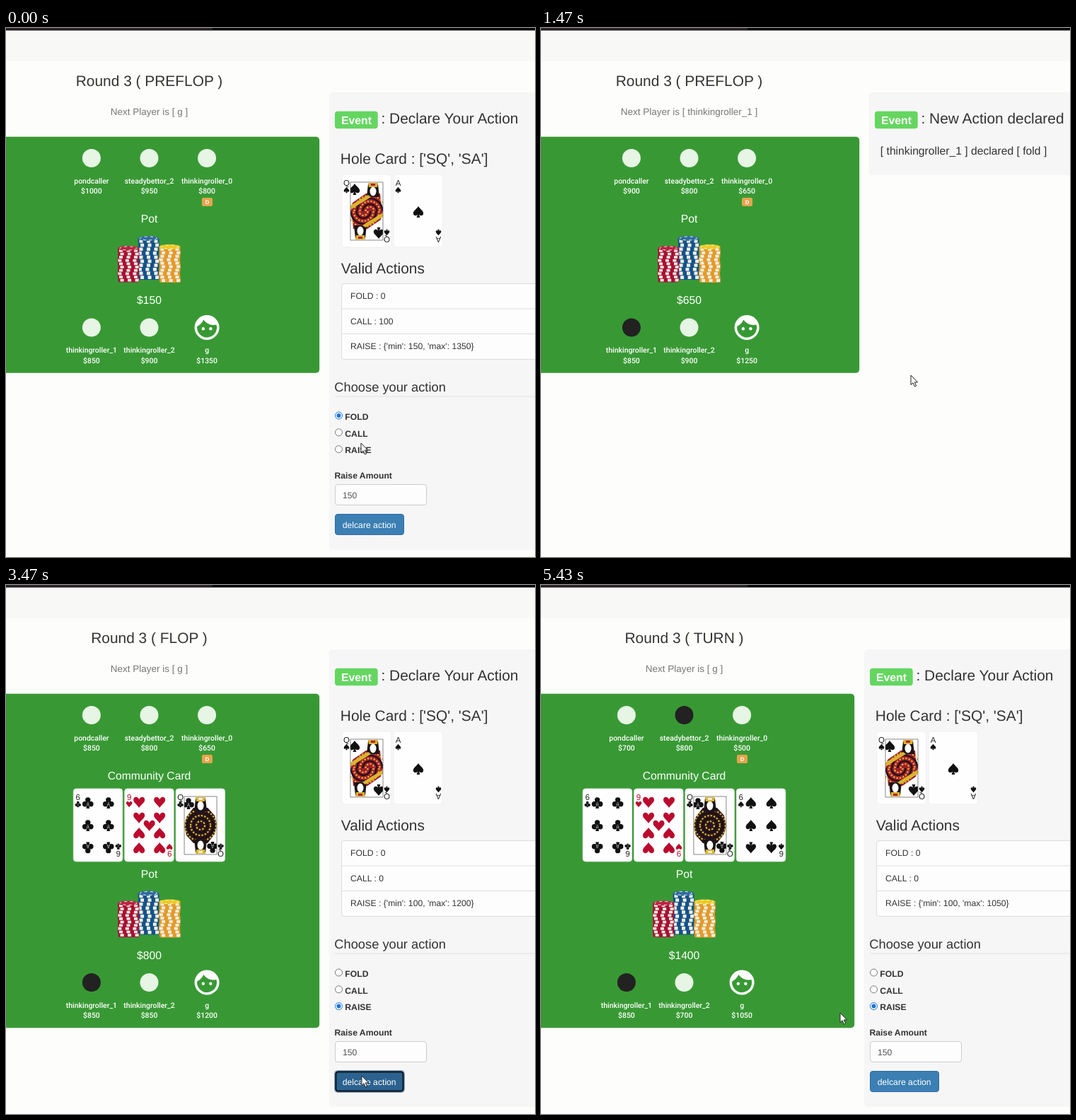
An HTML page with a canvas that plays this animation: 748x748 px, repeating every 5460 ms.

```html
<!DOCTYPE html>
<html lang="en">
<head>
<meta charset="utf-8">
<title>Card table</title>
<style>
html, body { margin: 0; width: 100%; height: 100%; overflow: hidden; background: #fdfdfc }
canvas { display: block }
</style>
</head>
<body>
<canvas id="stage" width="748" height="748"></canvas>
<script>
const c = document.getElementById('stage').getContext('2d');
const LOOP = 5460, GREEN = '#389934', ARIAL = '"Liberation Sans", Arial, sans-serif';
const NAMES = ['pondcaller', 'steadybettor_2', 'thinkingroller_0', 'thinkingroller_1', 'thinkingroller_2', 'g'];
const STACKS = [1000, 950, 800, 850, 900, 1350];
const COMMUNITY = ['6C', '9H', 'QC', '6S'];

// time, kind, then: player / paid / action, or street, or call / min / max
const EVENTS = [
  [0, 'ask', 100, 150, 1350],
  [530, 'act', 5, 100, 'call $100'],
  [740, 'act', 0, 100, 'call $100'],
  [950, 'act', 1, 150, 'raise $150'],
  [1160, 'act', 2, 150, 'call $150'],
  [1370, 'act', 3, 0, 'fold'],
  [1580, 'act', 4, 50, 'call $150'],
  [1700, 'ask', 150, 200, 1350],
  [2270, 'act', 5, 50, 'call $150'],
  [2470, 'act', 0, 50, 'call $150'],
  [2670, 'street', 'FLOP'],
  [2870, 'ask', 0, 100, 1200],
  [3580, 'act', 5, 150, 'raise $150'],
  [3800, 'act', 0, 150, 'call $150'],
  [4050, 'act', 1, 0, 'fold'],
  [4280, 'act', 2, 150, 'call $150'],
  [4510, 'act', 4, 150, 'call $150'],
  [4740, 'street', 'TURN'],
  [4950, 'ask', 0, 100, 1050]
];
const POINTER = [
  [0, 502, 587], [60, 502, 587], [180, 487, 570], [240, 487, 570], [410, 503, 692],
  [500, 503, 692], [590, 515, 550], [740, 523, 491], [1700, 523, 491], [1960, 508, 692],
  [2210, 508, 692], [2480, 455, 500], [2700, 420, 368], [2890, 420, 368], [3060, 473, 594],
  [3130, 473, 594], [3340, 503, 694], [3550, 503, 694], [3800, 467, 251], [4650, 467, 251],
  [5280, 423, 605], [LOOP, 423, 605]
];
const BUTTON = [[390, 530, '#2b628f'], [1960, 2270, '#254f70'], [3330, 3580, '#2b628f']];

const HEART = new Path2D('M0 1C-.3 .5-1 .1-1-.4C-1-1.05-.2-1.1 0-.45C.2-1.1 1-1.05 1-.4C1 .1 .3 .5 0 1Z');
const SPADE = new Path2D('M0-1C-.3-.5-.9-.2-.9 .25C-.9 .75-.3 .8-.1 .4L-.3 1H.3L.1 .4C.3 .8 .9 .75 .9 .25C.9-.2 .3-.5 0-1Z');
const CLUB = new Path2D('M-.1 0L-.3 1H.3L.1 0Z');
for (const [x, y] of [[0, -.52], [-.52, .22], [.52, .22]]) {
  CLUB.moveTo(x, y);
  CLUB.arc(x, y, .46, 0, 7);
}
const SUITS = { H: HEART, S: SPADE, C: CLUB };
const FACE = new Path2D('M-10 0A10 10 0 1 1 10 0A10 10 0 1 1-10 0ZM-7.95-.86A8 8 0 1 0 7.67-2.26C6.95-2.09 6.2-2 5.42-2C2.05-2-.93-3.67-2.74-6.23C-3.72-3.84-5.59-1.91-7.95-.86Z');
const ARROW = new Path2D('M0 0V13.5L3.1 10.7L5.4 16L7.6 15L5.3 9.9H9.5Z');
const HAND = new Path2D('M2 1Q3.5-.5 5 1V6L11 7.5Q12.5 8 12 10L10.5 16H4L-.5 10.5Q0 8.5 2 10Z');

function rect(x, y, w, h, fill, r = 0, line, width = 1) {
  c.beginPath();
  c.roundRect(x, y, w, h, r);
  if (fill) { c.fillStyle = fill; c.fill(); }
  if (line) { c.strokeStyle = line; c.lineWidth = width; c.stroke(); }
}
function oval(x, y, rx, ry, fill, line) {
  c.beginPath();
  c.ellipse(x, y, rx, ry, 0, 0, 7);
  if (fill) { c.fillStyle = fill; c.fill(); }
  if (line) { c.strokeStyle = line; c.lineWidth = 1; c.stroke(); }
}
function poly(fill, ...p) {
  c.beginPath();
  for (let i = 0; i < p.length; i += 2) c.lineTo(p[i], p[i + 1]);
  c.fillStyle = fill;
  c.fill();
}
function text(s, x, y, size, color = '#333', align = 'left', weight = 400, family = ARIAL) {
  c.font = `${weight} ${size}px ${family}`;
  c.textRendering = 'geometricPrecision';
  c.textAlign = align;
  c.fillStyle = color;
  c.fillText(s, x, y);
}
function at(x, y, turn, draw) {
  c.save();
  c.translate(x, y);
  c.rotate(turn * Math.PI);
  draw();
  c.restore();
}
function pip(suit, x, y, r, turn = 0) {
  at(x, y, turn, () => {
    c.scale(r, r);
    c.fillStyle = suit == 'H' ? '#ba0a2e' : '#111';
    c.fill(SUITS[suit]);
  });
}

function queenHalf(suit) {
  const spade = suit == 'S', fx = spade ? 9 : 0;
  c.beginPath();
  c.rect(-23, -41, 46, 41);
  c.clip();
  rect(-23, -41, 46, 41, '#fff');
  poly(spade ? '#a01c2e' : '#2a151c', -23, 0, -20, -12, fx - 10, -25, fx + 10, -25, 20, -14, 23, 0);
  // ornamented rings around the waist
  [6, 10, 14, 18, 22].forEach((r, i) => {
    c.beginPath();
    c.arc(fx / 2, 0, r, Math.PI, 0);
    c.lineWidth = 2.2;
    c.strokeStyle = i % 2 ? '#1c1216' : '#d9b530';
    c.setLineDash(i % 2 ? [] : [2.5, 2]);
    c.stroke();
  });
  c.setLineDash([]);
  poly('#1c1414', fx - 9, -20, fx - 7, -38, fx + 7, -38, fx + 9, -20);
  oval(fx, -28, 4.5, 6.5, '#fff');
  poly('#d9b530', fx - 6, -34, fx - 7, -40, fx + 7, -40, fx + 6, -34);
  poly(spade ? '#b81c30' : '#f4efe2', fx - 3, -36, fx - 3, -39, fx + 3, -39, fx + 3, -36);
  if (spade) poly('#d9b530', -23, -2, -23, -8, 2, -23, 6, -20);
  pip(suit, -17, -31, 8);
}

function card(id, x, y) {
  const [rank, suit] = id, color = suit == 'H' ? '#ba0a2e' : '#222';
  rect(x, y, 69.5, 103, '#fefefe', 4, '#e8ece8', .7);
  if (rank == 'A') pip(suit, x + 35, y + 53, 8);
  if (rank == '6') for (const px of [20.5, 49.5])
    [20, 52, 83.5].forEach((py, i) => pip(suit, x + px, y + py, 8, i == 2 ? 1 : 0));
  if (rank == '9') {
    for (const px of [20.5, 49.5])
      [19, 41, 63, 84].forEach((py, i) => pip(suit, x + px, y + py, 8, i > 1 ? 1 : 0));
    pip(suit, x + 35, y + 52, 8);
  }
  for (const turn of [0, 1]) at(x + 35, y + 52, turn, () => {
    if (rank == 'Q') {
      c.save();
      queenHalf(suit);
      c.restore();
    }
    text(rank, -28.5, -36, 11.5, color, 'center');
    pip(suit, -28.5, -30, 4.3);
  });
  if (rank == 'Q') rect(x + 12, y + 11, 46, 82, null, 0, '#555', .7);
}

function chips(x, top, bottom, color, cap) {
  const n = 10, h = (bottom - top - 4) / n;
  for (let i = 0; i < n; i++) {
    const y = bottom - (i + 1) * h, sway = Math.abs(i % 4 - 2) * 1.6 - 1.6;
    rect(x - 15 + sway / 3, y - 1, 30, h + 2, color, 2);
    for (const px of [-13, -2.5, 8]) rect(x + px + sway, y - .5, 5, h + .5, '#f4efe2');
  }
  oval(x, top + 3.5, 15, 3.5, cap);
  c.setLineDash([4, 4]);
  oval(x, top + 3.5, 12, 2.5, null, '#f4efe2');
  c.setLineDash([]);
}

function player(s, i, x, y) {
  if (i == 5) at(x, y, 0, () => {
    c.scale(1.75, 1.75);
    c.fillStyle = '#fff';
    c.fill(FACE, 'evenodd');
    oval(-3, 1, 1.25, 1.25, '#fff');
    oval(3, 1, 1.25, 1.25, '#fff');
  });
  else oval(x, y, 13, 13, s.folded[i] ? '#222' : '#e6f5e4');
  const line = (s, y) => text(s, x, y, 10.45, '#fff', 'center', 500, 'Roboto, sans-serif');
  line(NAMES[i], y + 35.5);
  line('$' + s.stacks[i], y + 50);
}

function board(s, dx) {
  const mid = 202.5 + dx, drop = s.cards ? 138.5 : 0;
  text(`Round 3 ( ${s.street} )`, mid, 82.3, 20.9, '#333', 'center');
  text(`Next Player is [ ${NAMES[s.who]} ]`, mid, 123.3, 13.5, '#777', 'center');
  rect(-10, 153.7, 453.2 + dx, 334 + drop, GREEN, 5);
  for (let i = 0; i < 6; i++)
    player(s, i, mid + (i % 3 - 1) * 81.6, i < 3 ? 184 : 423.5 + drop);
  rect(mid + 74.5, 240, 15, 12, '#e5a54c', 2);
  text('D', mid + 82, 249, 7.8, '#fff', 'center', 'bold');
  if (s.cards) {
    text('Community Card', mid, 275, 15.7, '#fff', 'center');
    for (let i = 0; i < s.cards; i++) card(COMMUNITY[i], mid + (i - s.cards / 2) * 72.4 + 1.4, 288);
  }
  text('Pot', mid, 275 + drop, 15.7, '#fff', 'center');
  chips(mid - 1, 294 + drop, 355 + drop, '#12528a', '#2f6da0');
  chips(mid - 29.5, 308 + drop, 358.5 + drop, '#a80f35', '#b82444');
  chips(mid + 29, 306 + drop, 359 + drop, '#e39a2c', '#eccb20');
  text('$' + s.pot, mid, 390 + drop, 15.7, '#fff', 'center');
}

function heading(title, dx) {
  rect(465 + dx, 117.7, 60.7, 24.5, '#64d660', 4);
  text('Event', 495.5 + dx, 135.5, 15.8, '#fff', 'center', 'bold');
  text(': ' + title, 530.5 + dx, 135.3, 20.9);
}

function askPanel(s, t) {
  rect(457, 91, 300, 647, '#f6f6f6', 5);
  heading('Declare Your Action', 0);
  text("Hole Card : ['SQ', 'SA']", 472.8, 192.3, 20.9);
  card('QS', 475, 207);
  card('AS', 548, 207);
  text('Valid Actions', 473.8, 347.3, 20.9);
  rect(474.5, 361.5, 300, 107, '#fdfdfd', 3.5, '#ddd');
  rect(475, 396.5, 290, 1, '#ddd');
  rect(475, 432, 290, 1, '#ddd');
  const [call, min, max] = s.ask;
  ['FOLD : 0', `CALL : ${call}`, `RAISE : {'min': ${min}, 'max': ${max}}`]
    .forEach((row, i) => text(row, 487, 383 + i * 35.5, 12.2));

  text('Choose your action', 464.3, 513.5, 18.3);
  rect(465, 520.5, 290, 1, '#e2e2e6');
  const chosen = t < 210 ? 0 : t < 3090 ? 1 : 2;
  ['FOLD', 'CALL', 'RAISE'].forEach((label, i) => {
    const y = 548 + i * 23.8, on = i == chosen;
    oval(470.5, y, 5, 5, '#fff', on ? '#1a73e0' : '#777');
    if (on) oval(470.5, y, 3, 3, '#1a73e0');
    text(label, 479.3, y + 5.8, 12.2, '#333', 'left', 'bold');
  });
  text('Raise Amount', 464.4, 636.5, 12.2, '#333', 'left', 'bold');
  rect(465.5, 645.5, 129, 29, '#fdfdfd', 3.5, '#ccc');
  text('150', 476, 664.5, 12.2, '#555');

  const press = BUTTON.find(b => t >= b[0] && t < b[1]);
  rect(465.5, 687.5, 97, 29, press ? press[2] : '#3b7fb3', 3.5, '#2e6da4');
  if (press) {
    rect(464.5, 686.5, 99, 31, null, 4, '#9aa4ae');
    rect(466.5, 688.5, 95, 27, null, 3, '#101820', 2);
  }
  text('delcare action', 513.7, 706.5, 12.2, '#fff', 'center');
}

function actPanel(s) {
  rect(463.5, 91, 300, 117, '#f6f6f6', 5);
  heading('New Action declared', 7);
  text(`[ ${NAMES[s.who]} ] declared [ ${s.action} ]`, 479.8, 179.3, 15.7);
}

function stateAt(t) {
  const s = { stacks: [...STACKS], folded: [], pot: 150, street: 'PREFLOP', cards: 0 };
  for (const [start, kind, ...v] of EVENTS) {
    if (start > t) break;
    s.ask = null;
    if (kind == 'ask') {
      s.ask = v;
      s.who = 5;
    } else if (kind == 'street') {
      s.street = v[0];
      s.cards = v[0] == 'FLOP' ? 3 : 4;
    } else {
      const [who, paid, action] = v;
      s.who = who;
      s.action = action;
      s.stacks[who] -= paid;
      s.pot += paid;
      if (action == 'fold') s.folded[who] = true;
    }
  }
  return s;
}

function pointer(t) {
  const i = POINTER.findIndex(p => p[0] > t), a = POINTER[i - 1], b = POINTER[i];
  const k = (t - a[0]) / (b[0] - a[0]), e = k * k * (3 - 2 * k);
  at(a[1] + (b[1] - a[1]) * e, a[2] + (b[2] - a[2]) * e, 0, () => {
    const shape = t > 1930 && t < 2270 ? HAND : ARROW;
    c.fillStyle = '#fff';
    c.fill(shape);
    c.strokeStyle = '#222';
    c.lineWidth = 1;
    c.stroke(shape);
  });
}

function frame(now) {
  const t = now % LOOP, s = stateAt(t);
  rect(0, 0, 748, 748, '#fdfdfc');
  rect(0, 4, 748, 43, '#f8f8f6');
  rect(0, 0, 748, 3.5, '#080608');
  rect(0, 0, 292, 2.5, '#2c2629');
  board(s, s.ask ? 0 : 7);
  if (s.ask) askPanel(s, t);
  else actPanel(s);
  pointer(t);
}

let begin;
function tick(now) {
  begin ??= now;
  frame(now - begin);
  requestAnimationFrame(tick);
}
requestAnimationFrame(tick);
</script>
</body>
</html>
```
